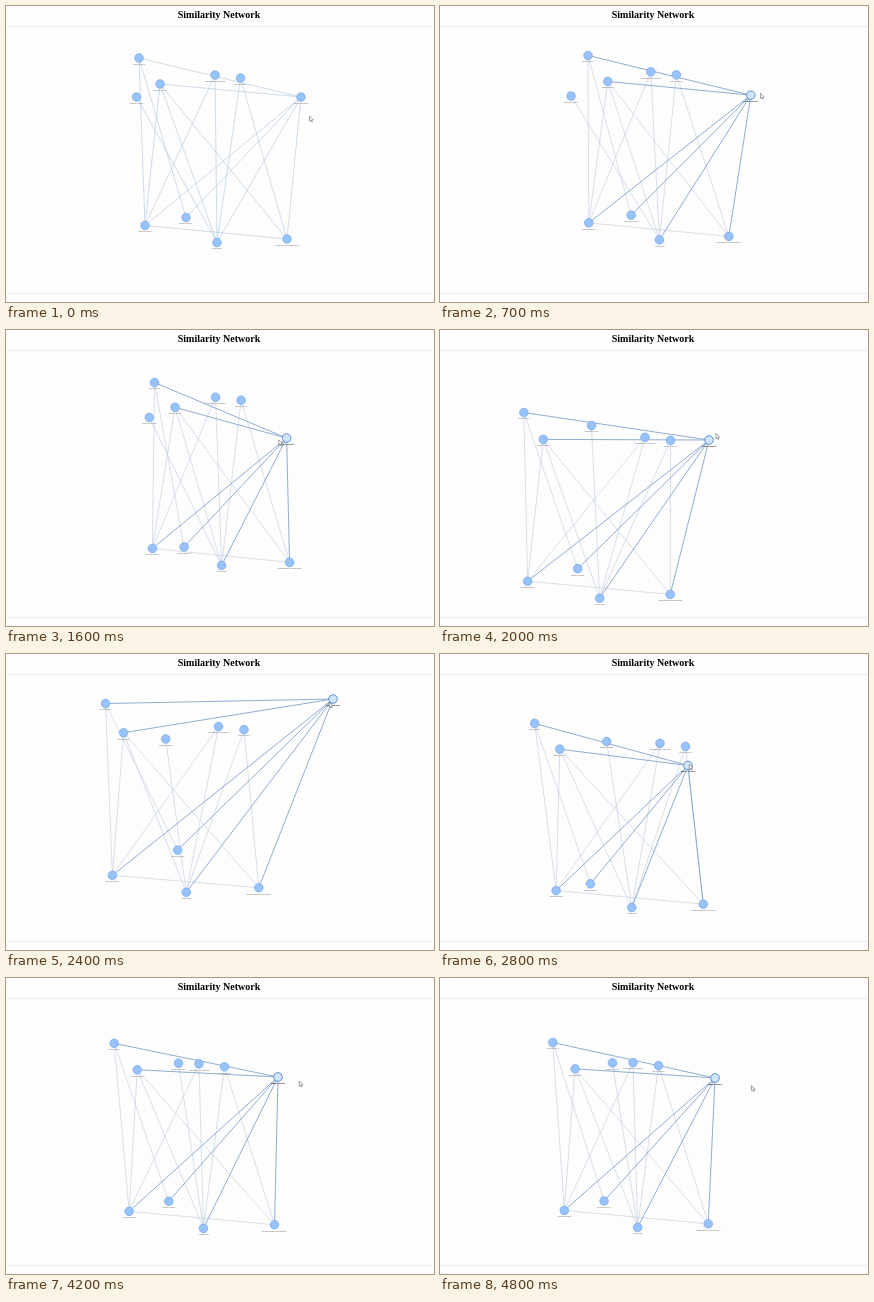
Write an HTML page with a canvas that moves like this. It is 428 by 296 pixels and loops after 4900 ms.

```html
<!DOCTYPE html>
<html lang="en">
<head>
<meta charset="utf-8">
<title>Similarity Network</title>
<style>
  html, body { margin: 0; width: 100%; height: 100%; overflow: hidden; background: #fdfdfe; }
  h1 {
    position: absolute; top: 0; left: 0; width: 426px; margin: 0;
    font: bold 10px/17px "Liberation Serif", "Times New Roman", serif;
    text-align: center; color: #000;
  }
  canvas { position: absolute; top: 0; left: 0; }
</style>
</head>
<body>
<canvas id="stage" width="428" height="296"></canvas>
<h1>Similarity Network</h1>
<script>
const LOOP = 4900, STEP = 100, GRAB = 0.6, RELEASE = 3.9;
const ctx = document.getElementById('stage').getContext('2d');

const node = (label, x, y) => ({ label, x, y, degree: 0, linked: false });
const topic = node('FirstTopic1', 133, 52);
const notes = node('TextNotes1', 154, 78);
const stray = node('OpenNotes1', 130.5, 91);
const related = node('RelatedDocument', 209, 69);
const record = node('Records12', 234.5, 72);
const hub = node('MainSubject', 295, 91);
const paper = node('ShortPaper1', 139, 219.5);
const second = node('OtherTopic1', 180, 211.5);
const abstract = node('Abstracts', 211, 236.5);
const report = node('ExtendedComparison', 281, 233);
const nodes = [topic, notes, stray, related, record, hub, paper, second, abstract, report];

const edges = [
  ...[topic, notes, paper, second, abstract, report].map(n => [hub, n]),
  ...[paper, abstract, report].map(n => [notes, n]),
  ...[paper, second].map(n => [topic, n]),
  ...[paper, abstract].map(n => [related, n]),
  ...[abstract, report].map(n => [record, n]),
  [stray, abstract], [paper, report]
];
for (const [a, b] of edges) {
  a.degree++;
  b.degree++;
  if (a === hub) b.linked = true;
}

// Key points of the drag: [time, x, y].
const dragPath = [
  [0.5, 295, 91], [1.1, 356, 84], [1.8, 262, 114], [2, 269, 110], [2.4, 327, 45],
  [2.8, 248, 111.5], [3.5, 267, 98], [3.75, 284, 95], [4.2, 272, 99], [4.7, 275, 100]
];
// Shift and tilt of the whole graph trailing the hub: [time, dx, dy, tilt].
const trail = [
  [0.5, 0, 0, 0], [1.1, 46, -17, -0.11], [1.25, 48, -27, -0.11], [2, -52, 32, 0],
  [2.15, -62, 33, 0], [2.4, -36, 3, 0.04], [2.8, -26, 17, 0.08], [3.1, -48, 22, 0.08],
  [3.5, -19, 10, 0.07], [4.2, -18, 14, 0.05], [4.7, -16, 13, 0.03]
];
// Sideways drift of nodes that are not tied to the hub: [time, dx].
const slack = [[0.5, 0], [1.1, 7], [2, -4], [2.8, 11], [3.5, -16]];

const ease = u => {
  const c = Math.min(1, Math.max(0, u));
  return c * c * (3 - 2 * c);
};

// Cubic interpolation of one column that never overshoots its keys.
function curve(keys, col, t) {
  const last = keys.length - 1;
  if (t <= keys[0][0]) return keys[0][col];
  if (t >= keys[last][0]) return keys[last][col];
  let i = 0;
  while (t >= keys[i + 1][0]) i++;
  const slope = k => (keys[k + 1][col] - keys[k][col]) / (keys[k + 1][0] - keys[k][0]);
  const tangent = k => {
    if (k === 0 || k === last) return 0;
    const a = slope(k - 1), b = slope(k);
    return a * b > 0 ? 2 * a * b / (a + b) : 0;
  };
  const h = keys[i + 1][0] - keys[i][0], u = (t - keys[i][0]) / h, w = 1 - u;
  return keys[i][col] + (keys[i + 1][col] - keys[i][col]) * ease(u)
    + h * u * w * (tangent(i) * w - tangent(i + 1) * u);
}

const hubAt = t => ({ x: curve(dragPath, 1, t), y: curve(dragPath, 2, t) });

function place(t) {
  const [dx, dy, tilt] = [1, 2, 3].map(col => curve(trail, col, t));
  const grip = hubAt(t);
  const aheadX = grip.x - hub.x - dx, aheadY = grip.y - hub.y - dy;
  const drift = ease((t - 0.5) / 3);

  const move = n => {
    if (n === hub) return grip;
    if (n.linked) {
      // Nodes with few links are drawn closer to the hub.
      const pull = 3 / n.degree ** 3;
      const lean = tilt * ((n.x - 200) * 0.4 + n.y - 150);
      return { x: n.x + dx + lean + pull * aheadX, y: n.y + dy + pull * aheadY };
    }
    if (n.degree === 1) return { x: n.x + 42 * drift, y: n.y + 0.3 * dy - 10 * drift };
    return { x: n.x + curve(slack, 1, t), y: n.y + 1.2 * dy };
  };
  return new Map(nodes.map(n => [n, move(n)]));
}

function pointerAt(t) {
  const tip = hubAt(t + 0.06);
  const before = 1 - ease(t / 0.4), after = ease((t - RELEASE) / 0.55);
  return {
    x: tip.x + 1 + 7.5 * before + 35.5 * after,
    y: tip.y - 1 + 20 * before + 8.5 * after
  };
}

function drawEdges(pts, list, color, width) {
  ctx.strokeStyle = color;
  ctx.lineWidth = width;
  for (const [a, b] of list) {
    ctx.beginPath();
    ctx.moveTo(pts.get(a).x, pts.get(a).y);
    ctx.lineTo(pts.get(b).x, pts.get(b).y);
    ctx.stroke();
  }
}

function drawNode(p, label, active) {
  ctx.beginPath();
  ctx.arc(p.x, p.y, 4.3, 0, Math.PI * 2);
  ctx.fillStyle = active ? '#d2e5ff' : '#97c2fc';
  ctx.fill();
  ctx.strokeStyle = active ? '#5b8fce' : '#74a5e3';
  ctx.lineWidth = active ? 1 : 0.7;
  ctx.stroke();
  ctx.font = (active ? 'bold ' : '') + '2.5px "Liberation Sans", Arial, sans-serif';
  ctx.fillStyle = active ? '#333' : '#666';
  ctx.fillText(label, p.x, p.y + 6.2);
}

function drawPointer({ x, y }) {
  ctx.save();
  ctx.translate(x, y);
  ctx.beginPath();
  [[0, 0], [0, 5.2], [1.2, 4.2], [2, 6], [2.9, 5.6], [2.1, 3.9], [3.7, 3.7]]
    .forEach(([px, py]) => ctx.lineTo(px, py));
  ctx.closePath();
  ctx.fillStyle = '#fff';
  ctx.fill();
  ctx.strokeStyle = '#666';
  ctx.lineWidth = 0.6;
  ctx.stroke();
  ctx.restore();
}

function draw(t) {
  const pts = place(t), held = t >= GRAB;
  ctx.clearRect(0, 0, 428, 296);
  ctx.fillStyle = '#ececee';
  ctx.fillRect(0, 20, 428, 1);
  ctx.fillRect(0, 287, 428, 1);

  if (held) {
    const onHub = e => e.includes(hub);
    drawEdges(pts, edges.filter(e => !onHub(e)), '#c0cbdc', 0.6);
    drawEdges(pts, edges.filter(onHub), '#7599c4', 0.8);
  } else {
    drawEdges(pts, edges, '#afc4d8', 0.6);
  }
  ctx.textAlign = 'center';
  ctx.textBaseline = 'middle';
  pts.forEach((p, n) => drawNode(p, n.label, held && n === hub));
  drawPointer(pointerAt(t));
}

const start = performance.now();
function tick() {
  const ms = (performance.now() - start) % LOOP;
  draw(Math.floor(ms / STEP) * STEP / 1000);
  requestAnimationFrame(tick);
}
tick();
</script>
</body>
</html>
```
